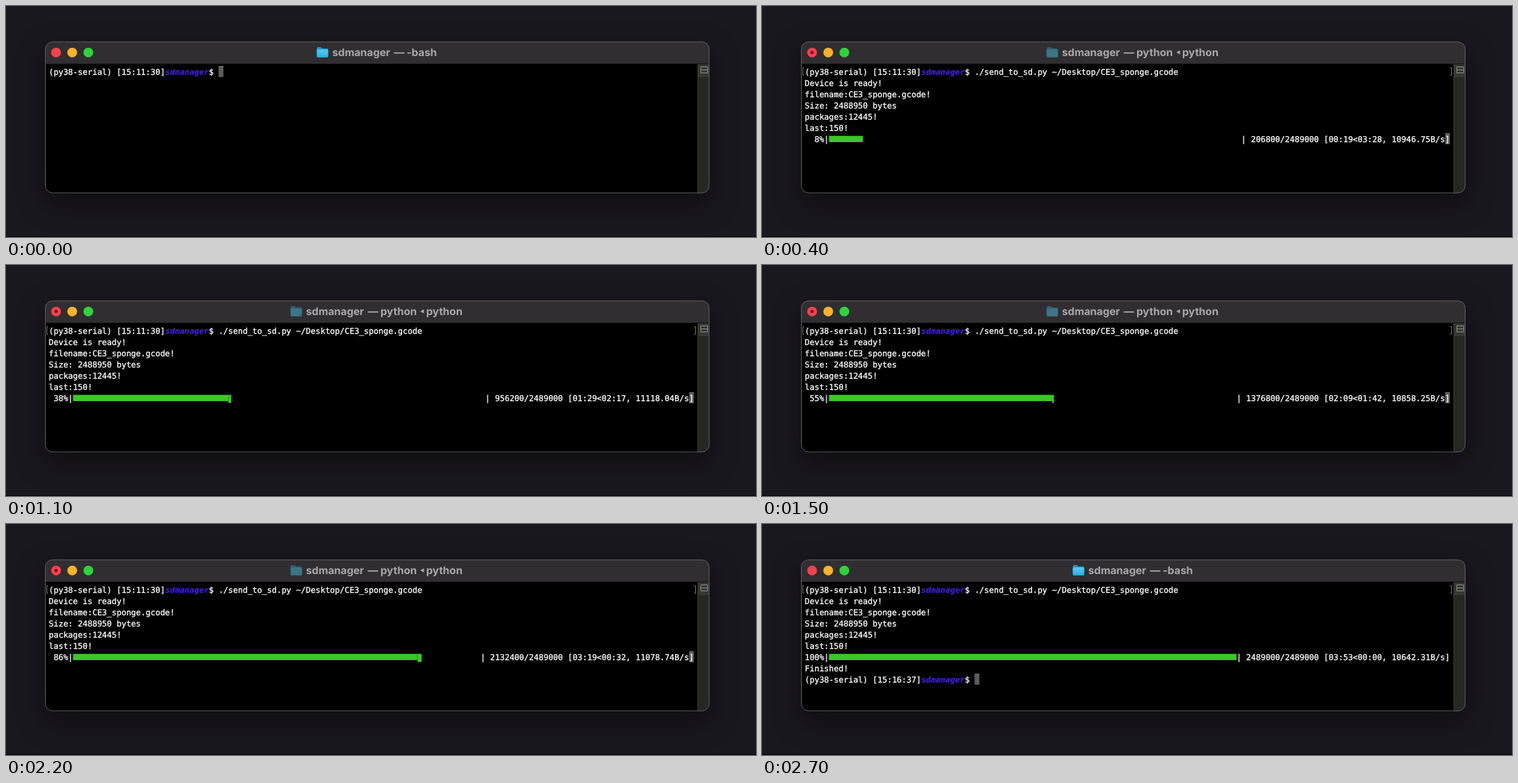
Animation, 1000 px wide and 309 px high, one loop 3000 ms. Source, as an HTML page:

```html
<!DOCTYPE html>
<html lang="en">
<head>
<meta charset="utf-8">
<title>Terminal upload</title>
<style>
  html, body { margin: 0; width: 100%; height: 100%; overflow: hidden; background: #1a181f; }
  svg { display: block; width: 1000px; height: 309px; }
  text { white-space: pre; text-rendering: geometricPrecision; }
  .window { filter: drop-shadow(0 13px 17px rgba(0, 0, 0, .5)); }
  .mono { font: 10.74px "DejaVu Sans Mono", "Noto Sans Mono", monospace; fill: #fff; }
  .mono text { stroke: #fff; stroke-width: .3px; }
  .mono .dir { font-weight: 700; font-style: italic; fill: #4a1df2; stroke: none; }
  .title { font: 700 14px Inter, "Open Sans", sans-serif; fill: #aaa8aa; }
  .marks { fill: none; stroke: #6c6c6c; }
  .cursor { fill: #5c5c5c; }
  .bar { fill: #39c925; }
</style>
</head>
<body>
<svg viewBox="0 0 1000 309">
  <defs>
    <clipPath id="frame"><rect x="52" y="47.5" width="886" height="203" rx="10"/></clipPath>
    <linearGradient id="blue" x2="0" y2="1">
      <stop offset="0" stop-color="#55cdf5"/><stop offset="1" stop-color="#29aee4"/>
    </linearGradient>
  </defs>
  <rect width="1000" height="309" fill="#1a181f"/>
  <rect y="308" width="1000" height="1" fill="#050406"/>
  <rect class="window" x="52" y="47.5" width="886" height="203" rx="10" fill="#000"/>
  <g clip-path="url(#frame)">
    <rect x="52" y="47" width="886" height="30" fill="#302e31"/>
    <rect x="52" y="77" width="886" height="1" fill="#111"/>
    <rect x="922" y="78" width="16" height="173" fill="#252723"/>
    <rect x="922" y="78" width="16" height="16" fill="#363834"/>
    <path d="M922.5 78V251M922 94.5H938" stroke="#393b37"/>
    <path d="M926.5 81.5H935.5V89.5H926.5ZM927 85.5H935" fill="none" stroke="#858783"/>
  </g>
  <rect x="52.5" y="48" width="885" height="202" rx="9.5" fill="none" stroke="#5a585c"/>
  <circle cx="66.8" cy="62.2" r="6.5" fill="#f5404e"/>
  <circle cx="88.3" cy="62.2" r="6.5" fill="#f8b32b"/>
  <circle cx="109.8" cy="62.2" r="6.5" fill="#2dd53c"/>
  <g id="live"></g>
</svg>
<script>
const CELL = 6.468, LEFT = 57, TOP = 80, ROW = 15, COLS = 133;
const TOTAL = 2489000;
// [seconds, bytes sent, bytes per second]
const PROGRESS = [
  [0, 0, 10820], [49, 533400, 11146.87], [89, 956200, 11118.04],
  [129, 1376800, 10858.25], [199, 2132400, 11078.74], [233, TOTAL, 10642.31]
];
const REPORT = ['Device is ready!', 'filename:CE3_sponge.gcode!', 'Size: 2488950 bytes',
  'packages:12445!', 'last:150!'];
const COMMAND = './send_to_sd.py ~/Desktop/CE3_sponge.gcode';
const live = document.getElementById('live');

const colX = col => LEFT + col * CELL;
const rect = (cls, x, y, w, h) => `<rect class="${cls}" x="${x}" y="${y}" width="${w}" height="${h}"/>`;
const cursor = (col, row) => rect('cursor', colX(col), TOP + row * ROW, CELL, ROW);
const escapeText = s => s.replace(/</g, '&lt;');

function put(s, col, row, cls = '') {
  return `<text class="${cls}" x="${colX(col)}" y="${TOP + 11.6 + row * ROW}">${escapeText(s)}</text>`;
}

function prompt(time, row) {
  return put('(py38-serial)', 0, row) + put(`[${time}]`, 14, row) +
    put('sdmanager', 24, row, 'dir') + put('$', 33, row);
}

function typed() {
  const [script, file] = COMMAND.split(' ');
  return put(script, 35, 0) + put(file, 36 + script.length, 0);
}

function title(x, word, active, child) {
  const label = (s, at, anchor = 'start') => `<text x="${at}" y="67" text-anchor="${anchor}">${s}</text>`;
  const back = active ? '#2397cb' : '#315f70';
  const front = active ? 'url(#blue)' : '#3d7587';
  let out = `<path d="M${x - 20.5} 56.5q0-1.5 1.5-1.5h4l1.5 1.7h6.5q1.5 0 1.5 1.5v8h-15z" fill="${back}"/>` +
    `<rect x="${x - 20.5}" y="58.2" width="15" height="10.5" rx="1.3" fill="${front}"/>`;
  out += label('sdmanager', x) + label('—', x + 89.3, 'middle') + label(word, x + 99.3);
  if (child) out += `<path d="M${x + 157.3} 59.3v5.4l-5-2.7z"/>` + label(child, x + 160.2);
  return `<g class="title">${out}</g>`;
}

function progressAt(sec) {
  const i = Math.max(1, PROGRESS.findIndex(p => p[0] >= sec));
  const a = PROGRESS[i - 1], b = PROGRESS[i];
  const k = (sec - a[0]) / (b[0] - a[0]);
  const mix = n => a[n] + (b[n] - a[n]) * k;
  return { sent: Math.round(mix(1) / 200) * 200, rate: mix(2) };
}

function clock(sec) {
  const two = n => String(n).padStart(2, '0');
  return two(Math.floor(sec / 60)) + ':' + two(Math.floor(sec % 60));
}

function progress(sec) {
  const { sent, rate } = progressAt(sec);
  const part = sent / TOTAL;
  const percent = Math.round(part * 100) + '%';
  const count = `${sent}/${TOTAL}`;
  const stats = `[${clock(sec)}<${clock((TOTAL - sent) / rate)}, ${rate.toFixed(2)}B/s]`;
  const statsCol = COLS - stats.length;
  const countCol = statsCol - 1 - count.length;
  const endCol = countCol - 2;
  const eighths = Math.floor(part * (endCol - 5) * 8);
  const full = Math.floor(eighths / 8), rest = eighths % 8 / 8;
  const y = TOP + 6 * ROW + 3.7;
  return rect('bar', colX(5), y, full * CELL, 8.4) +
    (rest ? rect('bar', colX(5 + full), y, rest * CELL, 10.8) : '') +
    put(percent, 4 - percent.length, 6) + put('|', 4, 6) + put('|', endCol, 6) +
    put(count, countCol, 6) + put(stats, statsCol, 6);
}

function draw(step) {
  const idle = step < 2 || step === 27;
  const sending = step > 2 && step < 26;
  let out = idle ? title(435, '-bash', true)
    : step === 2 ? title(431, 'python', false)
    : title(400, 'python', false, 'python');
  if (!idle) out += '<circle cx="66.8" cy="62.2" r="2.1" fill="#7c0713"/>';

  let body = '';
  if (step === 0) body += cursor(35, 0);
  if (step === 1) body += cursor(35 + COMMAND.length, 0);
  if (step === 2) body += cursor(0, 6);
  if (sending) body += cursor(COLS - 1, 6);
  if (step === 26) body += cursor(0, 7);
  if (step === 27) body += cursor(35, 8);

  body += prompt('15:11:30', 0);
  if (step > 0) body += typed();
  if (step > 1) {
    out += '<path class="marks" d="M56 82.5H54.5V92.5H56M917.5 82.5H919.5V92.5H917.5"/>';
    body += REPORT.map((line, i) => put(line, 0, i + 1)).join('');
  }
  // each step covers ten seconds of the upload
  if (step > 2) body += progress(Math.min(233, step * 10 - 21));
  if (step === 27) body += put('Finished!', 0, 7) + prompt('15:16:37', 8);
  live.innerHTML = out + `<g class="mono">${body}</g>`;
}

let shown = -1;
function tick() {
  const step = Math.min(27, Math.floor(performance.now() % 3000 / 100));
  if (step !== shown) draw(shown = step);
  requestAnimationFrame(tick);
}
tick();
</script>
</body>
</html>
```
